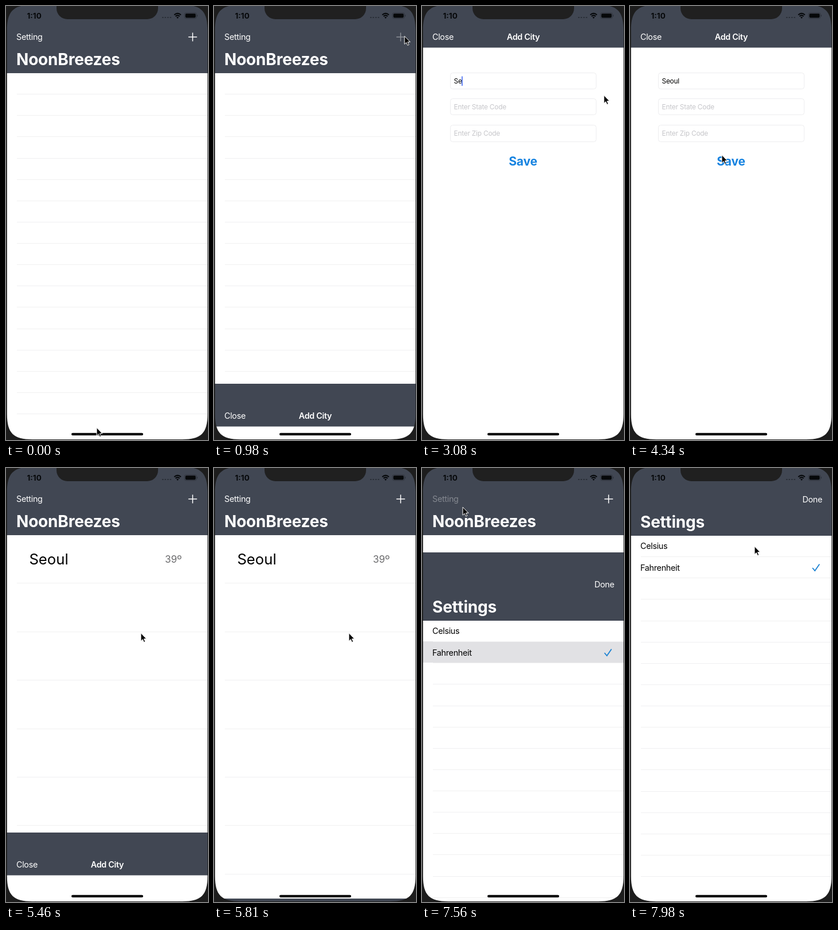
Write an HTML page that moves like this. It is 352x756 px and loops after 8 s.

```html
<!DOCTYPE html>
<html lang="en">
<head>
<meta charset="utf-8">
<title>City weather</title>
<style>
  html, body { margin: 0; width: 100%; height: 100%; overflow: hidden; background: #fff; }
  svg { display: block; width: 352px; height: 756px; }
  text { font: 14.35px Inter, Roboto, sans-serif; letter-spacing: -.3px; white-space: pre; }
  .bar { fill: #414753; }
  .light { fill: #fff; }
  .big { font-size: 28px; font-weight: 700; letter-spacing: -.2px; fill: #fff; }
  .semi { font-weight: 600; fill: #fff; }
  .field { font-size: 11.8px; letter-spacing: -.18px; }
  .hint { fill: #c6c6ca; }
  .box { fill: #fff; stroke: #ededef; }
  .rule { stroke: #f0f0f1; fill: none; }
</style>
</head>
<body>
<svg viewBox="0 0 352 756">
  <rect width="352" height="756" fill="#fff"/>

  <g id="home">
    <path id="shortRules" class="rule"/>
    <g id="cityList">
      <path id="tallRules" class="rule"/>
      <text x="40.4" y="168" style="font-size:25.7px;letter-spacing:0">Seoul</text>
      <text x="277" y="165" fill="#6b6b6d" style="font-size:17px;letter-spacing:0">39º</text>
    </g>
    <rect class="bar" width="352" height="117"/>
    <text id="setting" class="light" x="18" y="59">Setting</text>
    <path id="plus" d="M325.3 46.5v15M317.8 54h15" stroke="#fff" stroke-width="1.5"/>
    <text class="big" x="18" y="103">NoonBreezes</text>
  </g>

  <g id="addCity">
    <rect y="-2" width="352" height="758" fill="#fff"/>
    <rect class="bar" y="-2" width="352" height="74.5"/>
    <text class="light" x="18" y="59">Close</text>
    <text class="semi" x="176.5" y="59" text-anchor="middle">Add City</text>
    <rect class="box" x="49.5" y="116.5" width="254" height="28" rx="4"/>
    <rect class="box" x="49.5" y="161.5" width="254" height="28" rx="4"/>
    <rect class="box" x="49.5" y="207.5" width="254" height="29" rx="4"/>
    <text id="city" class="field" x="55.5" y="135"></text>
    <rect id="caret" y="122.5" width="1.6" height="16.5" fill="#426bf2"/>
    <text class="field hint" x="55.5" y="180">Enter State Code</text>
    <text class="field hint" x="55.5" y="226">Enter Zip Code</text>
    <text id="save" x="176" y="278" text-anchor="middle" fill="#1683e0" style="font-size:21px;font-weight:700;letter-spacing:-.2px">Save</text>
  </g>

  <g id="settings">
    <rect y="-2" width="352" height="758" fill="#fff"/>
    <rect id="picked" y="153" width="352" height="37" fill="#dadade"/>
    <path id="settingRules" class="rule"/>
    <rect class="bar" y="-2" width="352" height="119"/>
    <text class="light" x="335" y="59" text-anchor="end">Done</text>
    <text class="big" x="18" y="103">Settings</text>
    <text x="18" y="140">Celsius</text>
    <text x="18" y="177.5">Fahrenheit</text>
    <path d="M318 173l4.2 5 8-11.5" fill="none" stroke="#1b82d2" stroke-width="1.8"/>
  </g>

  <g id="device">
    <path fill="#1d1d1d" fill-rule="evenodd" d="M0-10H352V756H0zM46-2H307C340-2 351.2 9 351.2 42V711C351.2 744 340 755 307 755H46C13 755 1.8 744 1.8 711V42C1.8 9 13-2 46-2z"/>
    <path fill="#202020" d="M88 0v4a19 19 0 0 0 19 19H246a19 19 0 0 0 19-19V0z"/>
    <g fill="#06080a">
      <text x="36.5" y="22" style="font-size:13.5px;font-weight:700;letter-spacing:0">1:10</text>
      <path d="M272 20h16" stroke="#2b3039" stroke-width="2" stroke-dasharray="2.5 2"/>
      <path d="M293.2 15.5q5.8-5.2 11.6 0M295.4 18q3.6-3.2 7.2 0" fill="none" stroke="#06080a" stroke-width="2"/>
      <path d="M299 22l-2-2.2q2-1.6 4 0z"/>
      <rect x="311" y="11.8" width="21" height="10" rx="3" fill="none" stroke="#2b3039" stroke-width=".7"/>
      <rect x="312.5" y="13.2" width="18" height="7.2" rx="1.8"/>
      <rect x="332.6" y="15.3" width="1.2" height="3" rx=".6" fill="#2b3039"/>
    </g>
    <rect x="114" y="743.8" width="125" height="4.2" rx="2.1"/>
  </g>

  <path id="cursor" d="M0 0V14L3.2 11.1 5.4 16 7.7 15 5.5 10.2H9.9z" stroke="#fff"/>
</svg>
<script>
const $ = id => document.getElementById(id);
const LOOP = 8000, STEP = 70, HEIGHT = 756;

// Pointer stops: time, x, y
const stops = [
  [0, 158, 735], [420, 341, 30], [490, 341, 30], [770, 332, 53], [980, 332, 53],
  [1540, 219, 131], [1890, 219, 131], [2170, 317, 156], [3990, 317, 156],
  [4340, 160, 260], [4550, 164, 267], [4830, 164, 267], [5040, 235, 288],
  [5810, 235, 288], [5950, 232, 282], [6370, 57, 100], [6440, 57, 100],
  [6650, 42, 65], [6930, 42, 65], [7070, 44, 56], [7420, 44, 56], [7980, 217, 137]
];
const keyTimes = [2520, 3080, 3220, 3360, 3640];

const rules = gap => {
  let d = "";
  for (let y = 116 + gap; y < 740; y += gap) d += `M19 ${Math.round(y) + .5}H352`;
  return d;
};
$("shortRules").setAttribute("d", rules(37.13));
$("settingRules").setAttribute("d", rules(37.13));
$("tallRules").setAttribute("d", rules(84.4));

const between = (t, a, b) => t >= a && t < b;
const clamp = v => Math.min(1, Math.max(0, v));

// Critically damped spring from 0 to 1; rate in 1/s
const spring = (ms, rate) => {
  const x = Math.max(0, ms) * rate / 1000;
  return 1 - (1 + x) * Math.exp(-x);
};

const show = (el, on) => el.setAttribute("visibility", on ? "visible" : "hidden");
const fade = (id, opacity) => $(id).setAttribute("opacity", opacity);
const move = (el, x, y) => el.setAttribute("transform", `translate(${x} ${y})`);

function sheet(el, shown) {
  el.setAttribute("display", shown > 0 ? "inline" : "none");
  move(el, 0, Math.round(HEIGHT * (1 - shown)));
}

function pointer(t) {
  const i = Math.max(1, stops.findIndex(s => s[0] >= t));
  const [t0, x0, y0] = stops[i - 1], [t1, x1, y1] = stops[i];
  const k = clamp((t - t0) / (t1 - t0)), e = k * k * (3 - 2 * k);
  move($("cursor"), x0 + (x1 - x0) * e, y0 + (y1 - y0) * e - .5);
}

function typing(t) {
  const count = keyTimes.filter(k => t >= k).length, city = $("city");
  city.textContent = count ? "Seoul".slice(0, count) : "Enter City Name";
  city.setAttribute("class", count ? "field" : "field hint");
  $("caret").setAttribute("x", 55 + (count ? city.getComputedTextLength() : 0));
  fade("caret", between(t, 1960, 4100) || between(t, 4650, 5200) ? 1 : 0);
}

function draw(now) {
  const t = Math.floor(now % LOOP / STEP) * STEP;
  const loaded = t >= 5110;
  show($("shortRules"), !loaded);
  show($("cityList"), loaded);
  fade("plus", between(t, 910, 1500) ? .4 : 1);
  fade("setting", t >= 7210 ? .35 : 1);
  fade("save", between(t, 4690, 4900) ? .3 : 1);
  fade("picked", 1 - clamp((t - 7500) / 300));

  sheet($("addCity"), spring(t - 939, 15) - spring(t - 5172, 11.5));
  sheet($("settings"), spring(t - 7359, 15));
  typing(t);
  pointer(t);
  requestAnimationFrame(draw);
}
requestAnimationFrame(draw);
</script>
</body>
</html>
```
